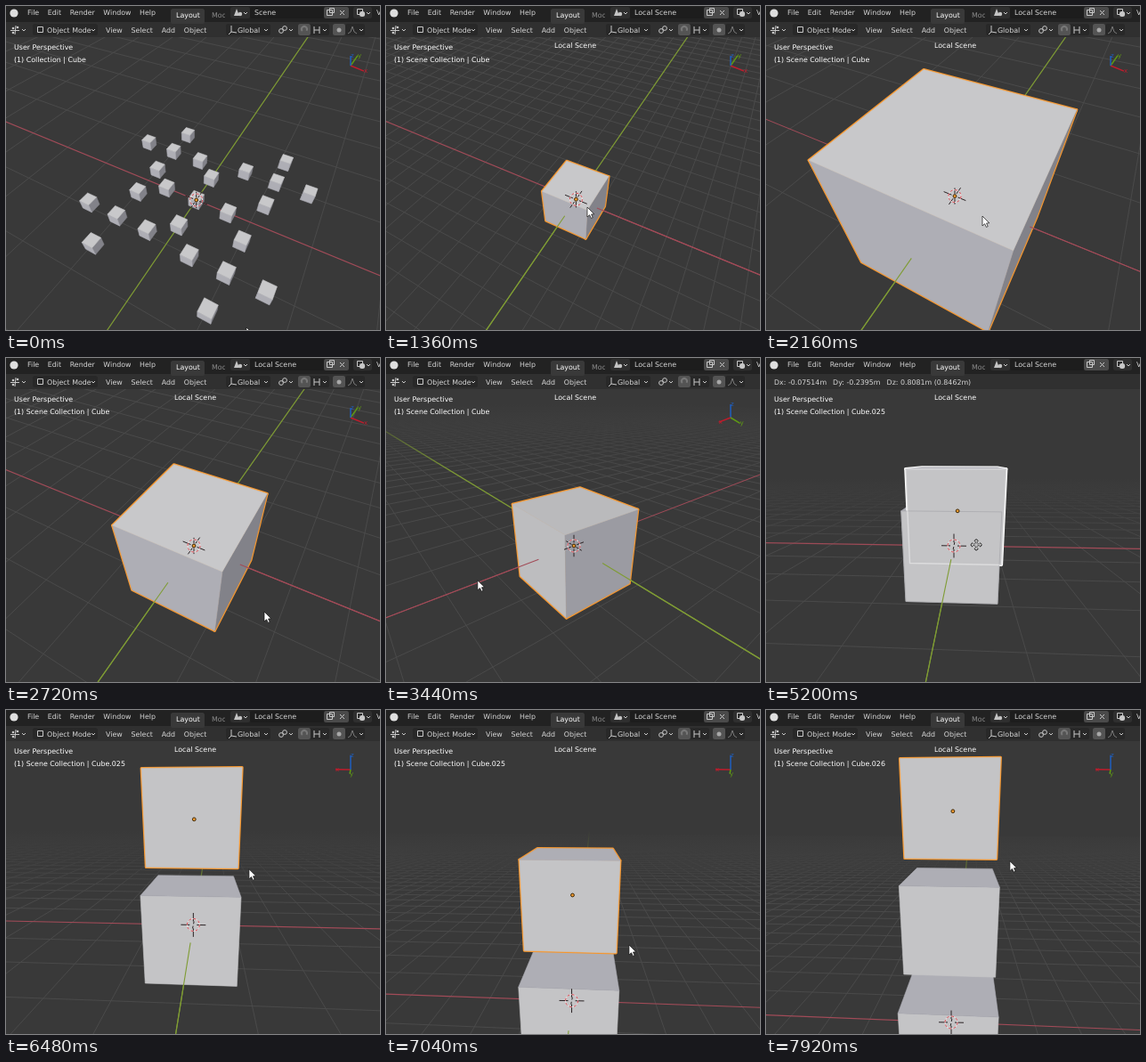
Recreate the animation shown at these times as an HTML page with a canvas. Size 420 by 364 pixels, loop 8 s.

```html
<!DOCTYPE html>
<html lang="en">
<head>
<meta charset="utf-8">
<style>
html, body { margin: 0; width: 100%; height: 100%; overflow: hidden; background: #393939; }
canvas { display: block; }
</style>
</head>
<body>
<canvas id="stage" width="420" height="364"></canvas>
<script>
const g = document.getElementById('stage').getContext('2d');
const LOOP = 8000, STEP = 80, FOCAL = 322, CX = 211, CY = 211, RAD = Math.PI / 180;
const BG = '#393939', RED = '#a24b58', GREEN = '#7f9c34', ORANGE = '#f6962c';
const LOCAL = 1200;                       // switch to the local scene
const LIFTS = [{ grab: 4640, move: 4950, drop: 6000 }, { grab: 7200, move: 7200, drop: 7860 }];
const RISE = 2.55, RISE_TIME = 650;

const clamp = u => Math.min(1, Math.max(0, u));
// 0 to 1 between a and b, slowing down for p > 1
const ramp = (t, a, b, p = 1) => 1 - (1 - clamp((t - a) / (b - a))) ** p;
const smooth = u => u * u * (3 - 2 * u);

// ---- 3D view ----
let right, up, back, dist, pan, tilt;
const dot = (a, b) => a[0] * b[0] + a[1] * b[1] + a[2] * b[2];
const mix = (a, m, b, n) => a.map((v, i) => v * m + b[i] * n);
const add = (a, b) => mix(a, 1, b, 1);
const axis = (i, n) => [0, 1, 2].map(j => j === i ? n : 0);
const view = p => [dot(p, right), dot(p, up), dist - dot(p, back)];

const turn = t => ramp(t, 2880, 3840, 1.5);
const pitch = t => ramp(t, 2880, 3840, 1.1);
const scroll = t => 140 * ramp(t, 6280, 7200);

function setCamera(t) {
  const az = (-61.9 + 155.2 * turn(t)) * RAD;
  tilt = (49.3 - 33.1 * pitch(t)) * RAD;
  dist = 50 * (3.68 / 50) ** ramp(t, LOCAL, 1500) * (6.92 / 3.68) ** ramp(t, 2160, 2940);
  const c = Math.cos(az), s = Math.sin(az), ce = Math.cos(tilt), se = Math.sin(tilt);
  right = [-s, c, 0];
  up = [-c * se, -s * se, ce];
  back = [c * ce, s * ce, se];
  const drift = 1 - ramp(t, LOCAL, 2720), y = scroll(t);
  pan = [2.7 * drift - y / 47, -7 * drift - y].map(v => v * dist / FOCAL);
}
function toScreen([x, y, w]) {
  return [CX + FOCAL * (x + pan[0]) / w, CY - FOCAL * (y + pan[1]) / w];
}
const project = p => toScreen(view(p));

function path(pts, close) {
  g.beginPath();
  pts.forEach(p => g.lineTo(p[0], p[1]));
  if (close) g.closePath();
}
function stroke(pts, color, width = 1, close) {
  path(pts, close);
  g.strokeStyle = color;
  g.lineWidth = width;
  g.stroke();
}
function fill(pts, color) {
  path(pts, true);
  g.fillStyle = color;
  g.fill();
}
function line3(p, q, color, width = 1) {
  let a = view(p), b = view(q);
  const near = .2;
  if (a[2] < near && b[2] < near) return;
  if (a[2] < near) [a, b] = [b, a];
  if (b[2] < near) {
    const u = (a[2] - near) / (a[2] - b[2]);
    b = mix(a, 1 - u, b, u);
  }
  stroke([toScreen(a), toScreen(b)], color, width);
}

function drawGround() {
  const step = dist > 15 ? 10 : 1, size = 60 * step;
  for (let i = -size; i <= size; i += step) if (i) {
    line3([i, -size, 0], [i, size, 0], '#4a4a4a');
    line3([-size, i, 0], [size, i, 0], '#4a4a4a');
  }
  line3([-900, 0, 0], [900, 0, 0], RED, 1.1);
  line3([0, -900, 0], [0, 900, 0], GREEN, 1.2);
  const h = CY - FOCAL * Math.tan(tilt);      // horizon
  const fade = g.createLinearGradient(0, h + 18, 0, h + 95);
  fade.addColorStop(0, BG);
  fade.addColorStop(1, 'rgba(57,57,57,0)');
  g.fillStyle = fade;
  g.fillRect(0, 0, 420, h + 95);
}

// faces turned to the eye, as outline and colour
function faces(pos) {
  const out = [];
  for (let i = 0; i < 3; i++) for (const s of [-1, 1]) {
    const n = axis(i, s), mid = view(add(pos, n)), nv = [dot(n, right), dot(n, up), dot(n, back)];
    if ((mid[0] + pan[0]) * nv[0] + (mid[1] + pan[1]) * nv[1] - mid[2] * nv[2] >= 0) continue;
    const a = axis((i + 1) % 3, 1), b = axis((i + 2) % 3, 1);
    const pts = [[-1, -1], [1, -1], [1, 1], [-1, 1]].map(
      ([u, v]) => project(add(add(pos, n), mix(a, u, b, v))));
    const v = Math.round(Math.max(130, 135 - 30 * nv[0] + 21 * nv[1] + 68 * nv[2]));
    out.push({ pts, color: `rgb(${v},${v},${v + (v < 180 ? 7 : 2)})`, front: i === 1 && s === 1 });
  }
  return out;
}
function drawFace(f, edge = f.color) {
  fill(f.pts, f.color);
  stroke(f.pts, edge, .6, true);
}
function drawCube(pos, outline) {
  const list = faces(pos);
  if (outline) list.forEach(f => stroke(f.pts, outline, 3, true));
  list.forEach(f => drawFace(f));
}
// five plus-shaped groups of five cubes, without the one at the origin
function scatter() {
  const groups = [[0, 0], [-10, 9.2], [11, 10.6], [-10, -9.2], [10.1, -10]];
  return groups.flatMap(([x, y]) =>
    [[0, 0], [6, 0], [-6, 0], [0, 6], [0, -6]].map(([dx, dy]) => [x + dx, y + dy, 0])).slice(1);
}
function drawNearAxes() {
  for (const i of [0, 1]) for (const s of [-1, 1])
    if (back[i] * s * dist > 1) line3(axis(i, s), axis(i, s * 900), i ? GREEN : RED, 1.1);
}
function disc(x, y, r, color, edge) {
  g.beginPath();
  g.arc(x, y, r, 0, 7);
  if (color) { g.fillStyle = color; g.fill(); }
  if (edge) { g.strokeStyle = edge; g.lineWidth = 1; g.stroke(); }
}
function drawCursor3D() {
  const [x, y] = project([0, 0, 0]);
  for (let i = 0; i < 3; i++) for (const s of [-1, 1]) {
    const n = axis(i, s), dx = dot(n, right), dy = -dot(n, up);
    stroke([[x + dx * 4, y + dy * 4], [x + dx * 14, y + dy * 14]], '#2a2224');
  }
  disc(x, y, 7, null, '#f0e4e4');
  g.setLineDash([2.75, 2.75]);
  disc(x, y, 7, null, '#d8404a');
  g.setLineDash([]);
}

// ---- interface ----
function text(s, x, y, color = '#d6d6d6', size = 7.9) {
  g.font = size + 'px "DejaVu Sans", sans-serif';
  g.fillStyle = color;
  g.fillText(s, x, y);
}
function row(words, x, y, gap) {
  for (const s of words) {
    text(s, x, y);
    x += g.measureText(s).width + gap;
  }
}
function box(x, y, w, h, color) {
  g.beginPath();
  g.roundRect(x, y, w, h, 2.5);
  g.fillStyle = color;
  g.fill();
}
const lines = (...list) => list.forEach(pts => stroke(pts, '#c8c8c8'));
const chevron = (x, y) => lines([[x - 2, y - 1], [x, y + 1], [x + 2, y - 1]]);
function frame(x, y, s) {
  g.strokeStyle = '#c8c8c8';
  g.lineWidth = 1;
  g.strokeRect(x + .5, y + .5, s, s);
}
function drawTopBar(local) {
  g.fillStyle = '#222';
  g.fillRect(0, 0, 420, 18);
  disc(9, 8, 4.6, '#dedede');
  row(['File', 'Edit', 'Render', 'Window', 'Help'], 24, 10, 9.6);
  box(185, 3, 38, 17, '#393939');
  text('Layout', 191, 13, '#fff');
  text('Mod', 231, 13, '#8c8c8c');
  g.fillStyle = '#222';
  g.fillRect(246, 0, 174, 18);
  box(252, 1, 22, 13, '#2f2f2f');
  fill([[256, 11], [259, 3], [262, 11]], '#c4c4c4');
  disc(263, 9, 2.2, '#c4c4c4');
  chevron(269, 8);
  box(274, 1, 84, 13, '#1d1d1d');
  text(local ? 'Local Scene' : 'Scene', 279, 10);
  box(357, 1, 28, 13, '#4a4a4a');
  frame(360, 4, 6);
  frame(363, 2, 5);
  lines([[375, 5], [380, 10]], [[380, 5], [375, 10]]);
  box(390, 1, 21, 13, '#2f2f2f');
  frame(394, 3, 6);
  box(397, 6, 6, 6, '#c8c8c8');
  chevron(407, 8);
  text('V', 416, 10);
}
function drawHeader() {
  for (const [x, y] of [[8, 25], [13, 24], [8, 30]]) disc(x, y, 1.3, '#c8c8c8');
  lines([[5, 27.5], [15, 27.5]], [[11, 22], [10, 32]]);
  chevron(20, 27);
  box(30, 20, 73, 13, '#282828');
  frame(35, 23, 6);
  text('Object Mode', 46, 30);
  chevron(98, 27);
  row(['View', 'Select', 'Add', 'Object'], 112, 30, 9.8);
  box(247, 20, 50, 13, '#282828');
  lines([[253, 22], [253, 29], [259, 30]], [[253, 29], [250, 32]]);
  text('Global', 260, 30);
  chevron(292, 27);
  disc(309, 28, 2.4, null, '#c8c8c8');
  disc(313, 25, 2.4, null, '#c8c8c8');
  chevron(320, 27);
  box(328, 20, 35, 13, '#282828');
  box(328, 20, 14, 13, '#545454');
  g.beginPath();
  g.arc(335, 26, 3, 2.4, 6.9);
  g.strokeStyle = '#777';
  g.lineWidth = 2;
  g.stroke();
  lines([[346, 23], [346, 31]], [[352, 23], [352, 31]], [[346, 27], [352, 27]]);
  chevron(358, 27);
  box(367, 20, 14, 13, '#545454');
  disc(374, 27, 2.5, '#a8a8a8');
  box(381, 20, 22, 13, '#282828');
  stroke([[384, 31], [387, 29], [389, 23], [391, 29], [394, 31]], '#777');
  chevron(399, 27);
}
function drawGizmo() {
  const x = 387, y = 67;
  ['#c01c2c', '#5f9a14', '#1f5fc0'].map((color, i) => ({ color, i, n: axis(i, 1) }))
    .sort((a, b) => dot(a.n, back) - dot(b.n, back))
    .forEach(({ color, i, n }) => {
      const ex = x + 17 * dot(n, right), ey = y - 17 * dot(n, up);
      stroke([[x, y], [ex, ey]], color, 1.5);
      text('xyz'[i], ex, ey + 2, color, 7);
    });
}
function drawMouse([x, y], moving) {
  if (!moving) {
    const arrow = [[0, 0], [0, 11], [2.6, 8.7], [4.4, 12.4], [6.2, 11.6], [4.6, 8], [7.8, 7.8]]
      .map(p => [x + p[0], y + p[1]]);
    fill(arrow, '#fff');
    stroke(arrow, '#111', .7, true);
    return;
  }
  for (const [color, w] of [['#222', 2.6], ['#eee', 1]])
    for (let i = 0; i < 4; i++) {
      const c = [1, 0, -1, 0][i], s = [0, 1, 0, -1][i];
      const put = (a, b) => [x + a * c - b * s, y + a * s + b * c];
      stroke([put(1.5, 0), put(5, 0)], color, w);
      stroke([put(3.5, -1.7), put(5.2, 0), put(3.5, 1.7)], color, w);
    }
}

// shift along the view's right and up while a cube is carried
function lift({ move }, t) {
  const s = smooth(ramp(t, move, move + RISE_TIME));
  return [.0955 * Math.sin(Math.PI * s) + .02 * s, RISE * s];
}
function mouseAt(t) {
  let x = 270, y = 361;
  const go = (u, dx, dy, v = u) => { x += dx * u; y += dy * v; };
  const first = ramp(t, 0, 880);
  go(first, -44, -135);
  x += 55 * Math.sin(Math.PI * first);
  go(ramp(t, 1700, 2160), 17, 10);
  go(ramp(t, 2160, 2720), 47, 49);
  go(turn(t), -256, -57, pitch(t));
  go(ramp(t, 3900, 4480), 198, 21);
  go(ramp(t, 6000, 6280), 40, 18);
  for (const l of LIFTS) {
    const [a, b] = lift(l, t);
    go(FOCAL / 6.92, a, -b);
  }
  return [x, y + scroll(t)];
}

function draw(t) {
  const local = t >= LOCAL;
  const held = LIFTS.findIndex(l => t >= l.grab && t < l.drop), moving = held >= 0;
  setCamera(t);
  g.lineJoin = 'round';
  g.fillStyle = BG;
  g.fillRect(0, 0, 420, 364);
  drawGround();

  const cubes = [[0, 0, 0]];
  let shift;
  for (const l of LIFTS) if (t >= l.grab) {
    const [a, b] = lift(l, t);
    shift = mix(right, a, up, b);
    cubes.push(add(cubes[cubes.length - 1], shift));
  }
  const active = cubes[cubes.length - 1];

  if (!local) {
    scatter().concat(cubes)
      .sort((a, b) => dot(a, back) - dot(b, back))
      .forEach(p => drawCube(p, p === active && t > 1000 ? ORANGE : null));
  } else {
    cubes.forEach(p => drawCube(p, p === active ? (moving ? '#fff' : ORANGE) : null));
    if (moving) {
      // the base cube hides the lower part of the one being lifted
      faces(cubes[held]).filter(f => f.front).forEach(f => drawFace(f, '#a2a2a6'));
      g.globalAlpha = .4;
      faces(active).filter(f => f.front).forEach(f => stroke(f.pts, '#fff', 1.5, true));
      g.globalAlpha = 1;
    }
    drawNearAxes();
  }
  drawCursor3D();
  disc(...project(active), 1.9, '#f09a30', '#3c2808');

  g.fillStyle = '#303030';
  g.fillRect(0, 18, 420, 17);
  drawTopBar(local);
  if (moving) {
    const m = v => v.toPrecision(4) + 'm', [dx, dy, dz] = shift;
    row(['Dx: ' + m(dx), 'Dy: ' + m(dy), `Dz: ${m(dz)} (${m(Math.hypot(dx, dy, dz))})`], 9, 30, 7);
  } else {
    drawHeader();
    drawGizmo();
  }
  text('User Perspective', 9, 49, '#fff');
  const name = 'Cube' + ['', '.025', '.026'][cubes.length - 1];
  text(`(1) ${local ? 'Scene ' : ''}Collection | ${name}`, 9, 63, '#fff');
  if (local) text('Local Scene', 189, 47, '#fff');
  drawMouse(mouseAt(t), moving);
}

const start = performance.now();
function tick() {
  const t = (performance.now() - start + 8) % LOOP;
  draw(Math.floor(t / STEP) * STEP);
  requestAnimationFrame(tick);
}
tick();
</script>
</body>
</html>
```
